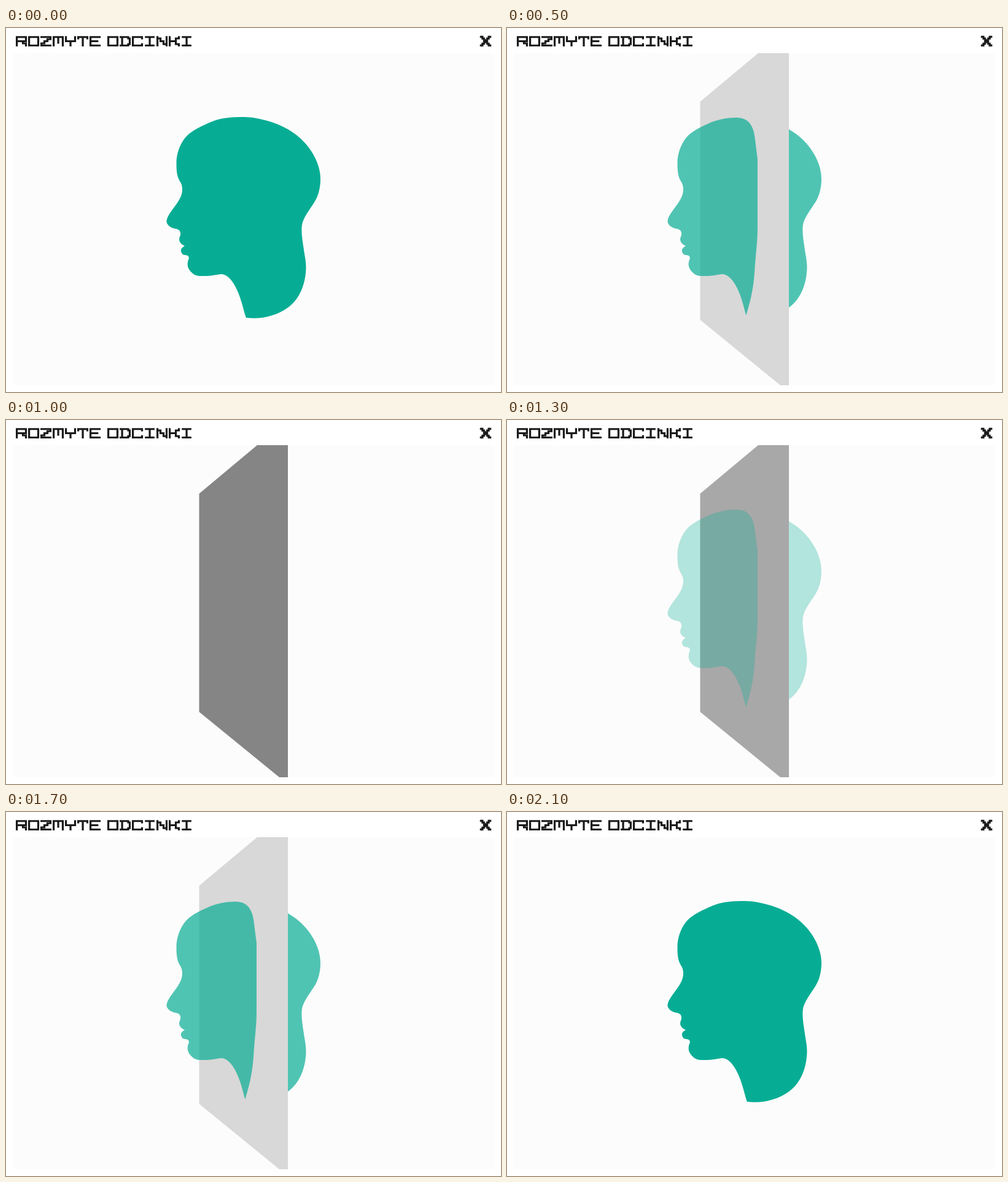
Recreate the animation shown at these times as an HTML page. Size 806x593 px, loop 2.2 s.

```html
<!DOCTYPE html>
<html lang="pl">
<head>
<meta charset="utf-8">
<title>ROZMYTE ODCINKI</title>
<style>
  html, body { margin: 0; width: 100%; height: 100%; overflow: hidden; background: #fff; }
  svg { display: block; width: 806px; height: 593px; }
</style>
</head>
<body>
<svg viewBox="0 0 806 593" xmlns="http://www.w3.org/2000/svg">
  <clipPath id="behind"><rect x="459" y="41" width="100" height="541"/></clipPath>
  <rect x="11" y="41" width="784" height="541" fill="#fcfcfc"/>
  <g id="title" role="img" fill="none" stroke="#1a1a1a" stroke-width="1.3" stroke-linecap="square"></g>
  <path transform="translate(772 13) scale(2.55 2.8)" fill="#1a1a1a" stroke="#1a1a1a" stroke-width=".25"
    d="M0 0h2v1h1v1h1v-1h1v-1h2v1h-1v1h-1v2h1v1h1v1h-2v-1h-1v-1h-1v1h-1v1h-2v-1h1v-1h1v-2h-1v-1h-1z"/>
  <path id="plane" fill="#858585" d="M314.5 120L409 41H459V582H445L314.5 475.5Z"/>
  <g fill="#06ad94">
    <path id="whole"/>
    <g id="split"><path id="front"/><path id="back" clip-path="url(#behind)"/></g>
  </g>
</svg>
<script>
const $ = id => document.getElementById(id);

// Letter strokes on a 6 x 6 grid
const glyphs = {
  R: 'M0 6V0H6V3H0M4 3V4.5H6V6',
  O: 'M0 0H6V6H0Z',
  Z: 'M0 0H6V1.5H4V3H2V4.5H0V6H6',
  M: 'M0 6V0H6V6M3 0V4',
  Y: 'M0 0V3H6V0M3 3V6',
  T: 'M0 1V0H6V1M3 0V6',
  E: 'M6 0H0V6H6M0 3H4.5',
  D: 'M0 0H5V1H6V5H5V6H0M1 0V6',
  C: 'M6 1V0H0V6H6V5',
  I: 'M.5 0H5.5M3 0V6M.5 6H5.5',
  N: 'M0 6V0M6 0V6M0 1H2V3H4V5H6',
  K: 'M0 0V6M6 0V1H4V3H0M4 3V5H6V6'
};

function drawTitle(text) {
  let x = 17.6;
  $('title').setAttribute('aria-label', text);
  for (const letter of text) {
    if (letter === ' ') { x += 9; continue; }
    const path = document.createElementNS('http://www.w3.org/2000/svg', 'path');
    path.setAttribute('d', glyphs[letter]);
    path.setAttribute('transform', `translate(${x} 14.7) scale(2.48 2.3)`);
    $('title').append(path);
    x += 20;
  }
}

// Profile from the throat up to the forehead
const face = `C386 459 382 430 366 410C360 403 355 401 350 401C340 402.5 334 404 322 404
  C312 404 308 404 302 398C296 392 295 387 296 381C297 377 299 375 297 372
  C295 369 290 371 287 368C284 364 284 360 288 357L291 355C287 353 283 351 282 345
  C282 340 285 338 284 334C283 327 278 328 272 326C266 324 261 319 261.5 314
  C263 303 277 290 283 278C288 269 288 259 285 253C280 244 277.5 240 277.5 220
  C277.5 201 287 180 300 171C308 165 316 161 325 157`;
const skull = `C340 150 348 147 368 145.5C380 144.5 392 145 402 146C420 149 440 154 459 165
  C494 185 512 219 512 246C512 265 506 279 500 287C494 296 487 306 483.5 315
  C479 326 483 347 484.5 358C486 370 488.5 378 488.5 390C488 422 475 444 459 455.5
  C440 469 416 475 391 472Z`;
const cut = `C340 150 354 146 374 146C394 146 402 160 404 182L408 214V325
  C408 345 406 360 404.5 378C403 395 403 410 399 430C397 442 393 455 389.5 468Z`;

$('whole').setAttribute('d', 'M391 472' + face + skull);
$('back').setAttribute('d', 'M391 472' + face + skull);
$('front').setAttribute('d', 'M389.5 468' + face + cut);
drawTitle('ROZMYTE ODCINKI');

// Fade level of the plane in each 100 ms slot; the head fades the opposite way
const levels = [0, .05, .1, .2, .2, .3, .55, .8, .8, .9, 1,
                .9, .8, .7, .7, .5, .4, .3, .3, .2, .1, 0];

function render(time) {
  const level = levels[Math.floor(time % 2200 / 100)];
  $('plane').setAttribute('opacity', level);
  $('whole').setAttribute('opacity', level ? 0 : 1);
  $('split').setAttribute('opacity', level ? 1 - level : 0);
}

const start = performance.now();
function tick() {
  render(performance.now() - start);
  requestAnimationFrame(tick);
}
tick();
</script>
</body>
</html>
```
